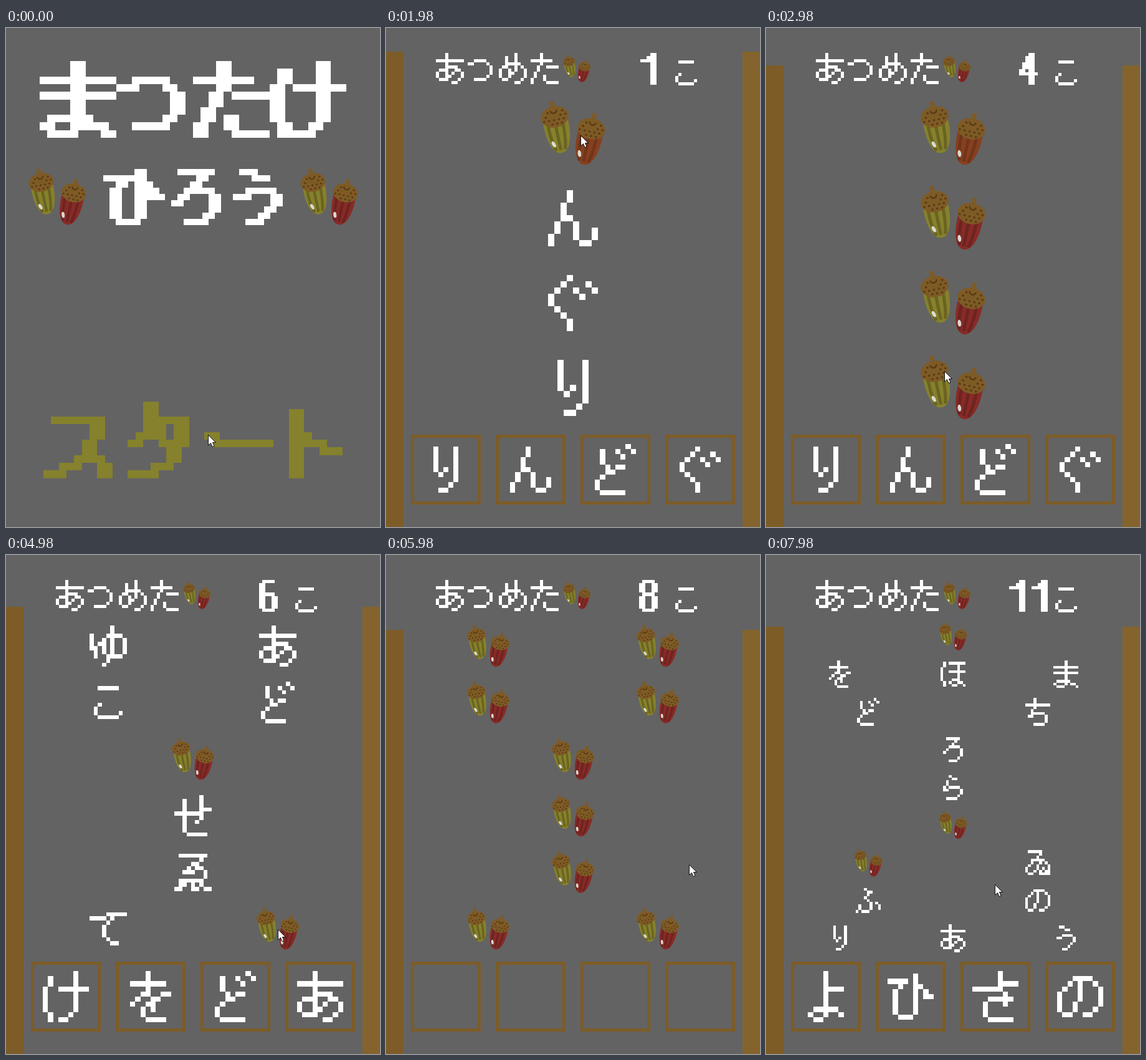
These frames come from a looping animation (600x800 px, 8 s). An HTML page with a canvas:

```html
<!DOCTYPE html>
<html lang="ja">
<head>
<meta charset="utf-8">
<title>まつたけひろう</title>
<style>
html, body { margin: 0; width: 100%; height: 100%; overflow: hidden; background: #636363; }
canvas { display: block; }
</style>
</head>
<body>
<canvas id="stage" width="600" height="800"></canvas>
<script>
const ctx = document.getElementById('stage').getContext('2d');
const LOOP = 8000, GREY = '#636363', OLIVE = '#85812d', BROWN = '#7d5c28', WHITE = '#fff';

// Pen strokes of the lettering on a ten-cell grid, one string per stroke.
const GLYPHS = {
  ど: ['1,1 1,3', '2,4 2,5 3,5', '4,4 5,4', '1,6 0,7 0,8 1,9 5,9', '4,1 5,2', '6,0 7,1'],
  ん: ['3,0 3,1 2,2 2,4 1,5 1,6 0,7 0,8', '3,4 4,5 4,7 5,8 6,8 7,7 7,6'],
  ぐ: ['3,0 0,3 0,4 3,7 3,8', '4,2 5,3', '6,1 7,2'],
  り: ['0,0 0,4 1,5 2,4', '4,0 4,6 3,7 2,8 1,8'],
  あ: ['0,2 8,2', '3,0 3,7', '6,4 5,6 3,8 1,8 0,7 0,6 1,5 3,4 6,4 8,6 8,7 7,8 5,9'],
  つ: ['0,3 1,3 2,2 5,2 6,3 7,4 7,6 6,7 5,8 2,8'],
  め: ['2,1 2,4 3,6 3,7', '5,0 5,4 4,6 3,7 2,8 1,8 0,7 0,5 2,3 6,3 8,5 8,7 7,8 5,9'],
  た: ['0,2 6,2', '3,0 3,2 2,4 2,5 0,8 0,9', '5,4 8,4', '4,7 4,8 5,9 8,9'],
  け: ['1,1 1,2 0,3 0,7 1,8 1,9', '3,3 8,3', '6,0 6,7 5,8 4,9 3,9'],
  ゆ: ['0,2 0,5 1,6 1,7', '1,5 4,2 7,2 8,3 8,6 7,7 4,7 3,6 3,4', '5,0 5,7 4,8 3,9'],
  こ: ['1,0 5,0', '1,4 0,5 0,6 1,7 5,7 6,6'],
  せ: ['0,4 5,4 6,3 8,3', '2,1 2,8 3,9 7,9', '6,0 6,5 5,6'],
  ゑ: ['1,0 7,0 2,4 6,3 7,4 7,5 5,6 1,6', '3,6 0,8 1,8', '4,7 4,8 5,8', '6,7 7,8 8,8'],
  て: ['0,1 3,1 4,0 8,0', '6,0 3,3 3,5 5,7 6,7'],
  を: ['0,2 6,2', '3,0 3,3 0,6', '2,4 3,4 4,5 4,7', '7,4 6,4 3,6 2,7 2,8 3,9 6,9'],
  ほ: ['1,0 1,1 0,2 0,6 1,7 1,8', '3,0 8,0', '3,3 8,3', '6,0 6,7 5,8 4,8 3,7 4,6 6,6 8,8'],
  ま: ['0,2 8,2', '0,4 8,4', '4,0 4,8 3,9 1,9 0,8 1,7 5,7 8,9'],
  ち: ['0,2 8,2', '3,0 3,2 2,5 1,6', '2,6 3,5 6,5 7,6 7,8 6,9 3,9'],
  ろ: ['2,0 6,0 1,5', '3,3 6,3 7,4 7,6 5,8 3,8'],
  ら: ['2,0 4,1', '1,2 0,5 2,4 5,4 6,5 6,6 4,8 1,8'],
  ゐ: ['1,0 5,0 4,2 0,6 0,7 1,8 2,8 4,6 5,3', '2,3 6,3 8,5 8,7 7,8 5,8 5,7 6,6 8,8'],
  ふ: ['3,0 5,1', '4,2 3,3 5,5 5,7 4,8 2,8', '0,8 1,6', '7,5 8,6 8,7'],
  の: ['4,0 4,3 2,7 1,7 0,6 0,3 3,0 6,0 8,2 8,5 6,7 5,7'],
  う: ['2,0 5,1', '1,4 3,3 6,3 7,4 7,5 4,8 3,8'],
  よ: ['3,0 3,8 2,9 1,9 0,8 1,7 5,7 6,8', '4,3 6,3'],
  ひ: ['0,1 3,1 1,3 1,7 2,8 4,8 5,7 5,0', '5,1 6,2 7,3 7,4 8,4'],
  さ: ['0,3 5,3 6,2 8,2', '5,0 5,3 7,5 6,6', '6,5 3,5 2,6 2,8 3,9 7,9'],
  ス: ['1,2 6,2 6,4 5,5 5,6 3,8 2,8 1,9 0,9', '6,7 7,8 7,9'],
  タ: ['3,0 3,3 1,5', '3,2 7,2 7,5 6,6 6,7 5,8 4,8 3,9 1,9', '4,3 4,4 6,6'],
  ー: ['1,4 2,5 8,5'],
  ト: ['2,1 2,9', '3,4 4,5 5,5 6,6 7,6'],
  0: ['1,0 3,0 4,1 4,8 3,9 1,9 0,8 0,1 1,0', '2,3 2,6'],
  1: ['0,2 1,2 3,0 3,9'],
  4: ['3,0 3,9', '2,1 0,5 0,6 4,6'],
  6: ['3,0 1,0 0,1 0,8 1,9 3,9 4,8 4,5 3,4 1,4'],
  8: ['1,0 3,0 4,1 4,3 3,4 1,4 0,3 0,1 1,0', '3,4 4,5 4,8 3,9 1,9 0,8 0,5 1,4']
};

function traceCells(stroke) {
  const pts = stroke.split(' ').map(p => p.split(',').map(Number));
  const cells = [pts[0]];
  for (let i = 1; i < pts.length; i++) {
    const [ax, ay] = pts[i - 1], [bx, by] = pts[i];
    const steps = Math.max(Math.abs(bx - ax), Math.abs(by - ay));
    for (let k = 1; k <= steps; k++) {
      cells.push([Math.round(ax + (bx - ax) * k / steps), Math.round(ay + (by - ay) * k / steps)]);
    }
  }
  return cells;
}

const cellsOf = {};
for (const ch in GLYPHS) cellsOf[ch] = GLYPHS[ch].flatMap(traceCells);

// Pixel lettering, centred on its ink.
function text(str, cx, cy, size, { bold = false, color = WHITE, advance = 10 } = {}) {
  const cells = [...str].flatMap((ch, i) => cellsOf[ch].map(([x, y]) => [x + i * advance, y]));
  const xs = cells.map(c => c[0]), ys = cells.map(c => c[1]);
  const wide = bold ? 2 : 1;
  const left = cx - (Math.min(...xs) + Math.max(...xs) + wide) * size / 2;
  const top = cy - (Math.min(...ys) + Math.max(...ys) + 1) * size / 2;
  ctx.fillStyle = color;
  for (const [x, y] of cells) {
    const x0 = Math.round(left + x * size), y0 = Math.round(top + y * size);
    ctx.fillRect(x0, y0, Math.round(left + (x + wide) * size) - x0, Math.round(top + (y + 1) * size) - y0);
  }
}

function oval(x, y, rx, ry, color, turn = 0) {
  ctx.fillStyle = color;
  ctx.beginPath();
  ctx.ellipse(x, y, rx, ry, turn, 0, Math.PI * 2);
  ctx.fill();
}

function acorn(x, y, turn, body, stripe) {
  ctx.save();
  ctx.translate(x, y);
  ctx.rotate(turn);

  ctx.save();
  ctx.beginPath();
  ctx.moveTo(-20, 4);
  ctx.bezierCurveTo(-22, 34, -14, 59, 0, 59);
  ctx.bezierCurveTo(14, 59, 22, 34, 20, 4);
  ctx.closePath();
  ctx.fillStyle = body;
  ctx.fill();
  ctx.clip();
  ctx.strokeStyle = stripe;
  ctx.lineWidth = 5;
  for (const sx of [-13, -1, 11]) {
    ctx.beginPath();
    ctx.moveTo(sx, 0);
    ctx.quadraticCurveTo(sx * 1.1, 36, sx * 0.6, 54);
    ctx.stroke();
  }
  ctx.restore();
  oval(-10, 43, 2.8, 5.5, '#dcd9d2', -0.35);

  ctx.strokeStyle = '#7e5a25';
  ctx.lineWidth = 7;
  ctx.beginPath();
  ctx.moveTo(-1, -25);
  ctx.quadraticCurveTo(1, -18, 0, -8);
  ctx.stroke();
  oval(0, 0, 22.5, 17, '#7e5a25');
  ctx.strokeStyle = '#573a14';
  ctx.lineWidth = 2.5;
  ctx.beginPath();
  ctx.arc(0, -11, 5, 0, Math.PI);
  ctx.stroke();
  for (let row = 0; row < 4; row++) {
    for (let i = -2; i <= 2; i++) {
      const dx = i * 8 + (row % 2) * 4 - 2, dy = row * 6.5 - 8;
      const inside = (dx / 20) ** 2 + (dy / 15) ** 2 < 1;
      if (inside && (row > 1 || Math.abs(dx) > 7)) oval(dx, dy, 1.9, 1.6, '#573a14');
    }
  }
  ctx.restore();
}

function acorns(cx, cy, scale, red = '#872b27', redStripe = '#6e2320') {
  ctx.save();
  ctx.translate(cx, cy);
  ctx.scale(scale, scale);
  acorn(-29.5, -26, -0.2, OLIVE, '#6a6320');
  acorn(29.5, -7, 0.22, red, redStripe);
  ctx.restore();
}

function pointer(x, y) {
  ctx.save();
  ctx.translate(x + 0.5, y + 0.5);
  ctx.beginPath();
  ctx.moveTo(0, 0);
  for (const [px, py] of [[0, 16.5], [4, 13], [6.5, 19], [9.5, 17.7], [7, 12], [12, 12]]) ctx.lineTo(px, py);
  ctx.closePath();
  ctx.fillStyle = WHITE;
  ctx.fill();
  ctx.strokeStyle = '#111';
  ctx.lineWidth = 1;
  ctx.stroke();
  ctx.restore();
}

function titleScreen() {
  text('まつたけ', 300, 114.5, 12.3, { bold: true });
  text('ひろう', 300, 271, 9.9, { bold: true });
  acorns(82.5, 270.5, 0.885);
  acorns(518.5, 270.5, 0.885);
  text('スタート', 300, 660, 12.3, { bold: true, color: OLIVE });
}

function playScreen({ rows, found, boxes, wall, score, click, tint }) {
  ctx.fillStyle = BROWN;
  ctx.fillRect(0, wall, 28, 800 - wall);
  ctx.fillStyle = '#84642c';
  ctx.fillRect(572, wall, 28, 800 - wall);

  text('あつめた', 178.5, 65, 5.05);
  acorns(306, 65, 0.43);
  text(String(score), 421, 65.5, 5.1, { bold: true, advance: 7 });
  text('こ', 481.5, 72, 5);

  if (click) oval(click[0], click[1], 12, 12, '#aeaa2c');
  const n = rows.length, step = 544 / n;
  rows.forEach((row, r) => {
    const gap = 544 / row.length, y = 101 + step * (r + 0.5);
    [...row].forEach((ch, i) => {
      const x = 28 + gap * (i + 0.5);
      if (!found.includes(ch)) text(ch, x, y - 0.5, 40 / n);
      else if (tint && r === 0) acorns(x, y - 0.5, 4 / n, '#87401f', '#70351b');
      else acorns(x, y - 0.5, (n > 4 ? 3.93 : 4) / n);
    });
  });

  ctx.strokeStyle = BROWN;
  ctx.lineWidth = 5;
  for (let i = 0; i < 4; i++) {
    const x = 96 + i * 136;
    ctx.strokeRect(x - 53.5, 654.5, 107, 107);
    if (boxes[i]) text(boxes[i], x, 708, 8.17);
  }
}

const easy = { rows: ['ど', 'ん', 'ぐ', 'り'], boxes: 'りんどぐ' };
const mid = { rows: ['ゆあ', 'こど', 'け', 'せ', 'ゑ', 'てを'], boxes: 'けをどあ' };
const hard = { rows: ['よ', 'をほま', 'どち', 'ろ', 'ら', 'ひ', 'さゐ', 'ふの', 'りあう'], boxes: 'よひさの' };

const scenes = [
  { at: 0, mouse: [324, 652] },
  { at: 1000, ...easy, found: '', wall: 16, score: 0, mouse: [324, 329] },
  { at: 1980, ...easy, found: 'ど', wall: 38, score: 1, mouse: [312, 172], tint: true },
  { at: 2980, ...easy, found: 'どんぐり', wall: 60, score: 4, mouse: [286, 550], tint: true },
  { at: 3980, ...mid, found: '', wall: 46, score: 4, mouse: [300, 328], click: [300, 328] },
  { at: 4980, ...mid, found: 'けを', wall: 83, score: 6, mouse: [436, 600] },
  { at: 5980, ...mid, boxes: '', found: mid.rows.join(''), wall: 120, score: 8, mouse: [486, 496] },
  { at: 6980, ...hard, found: '', wall: 34, score: 8, mouse: [486, 496] },
  { at: 7980, ...hard, found: 'よひさ', wall: 115, score: 11, mouse: [367, 528] }
];

function draw(time) {
  const scene = scenes.filter(s => s.at <= time).pop();
  ctx.fillStyle = GREY;
  ctx.fillRect(0, 0, 600, 800);
  if (scene.rows) playScreen(scene);
  else titleScreen();
  pointer(...scene.mouse);
}

const start = performance.now();
function tick() {
  draw((performance.now() - start) % LOOP);
  requestAnimationFrame(tick);
}
tick();
</script>
</body>
</html>
```
